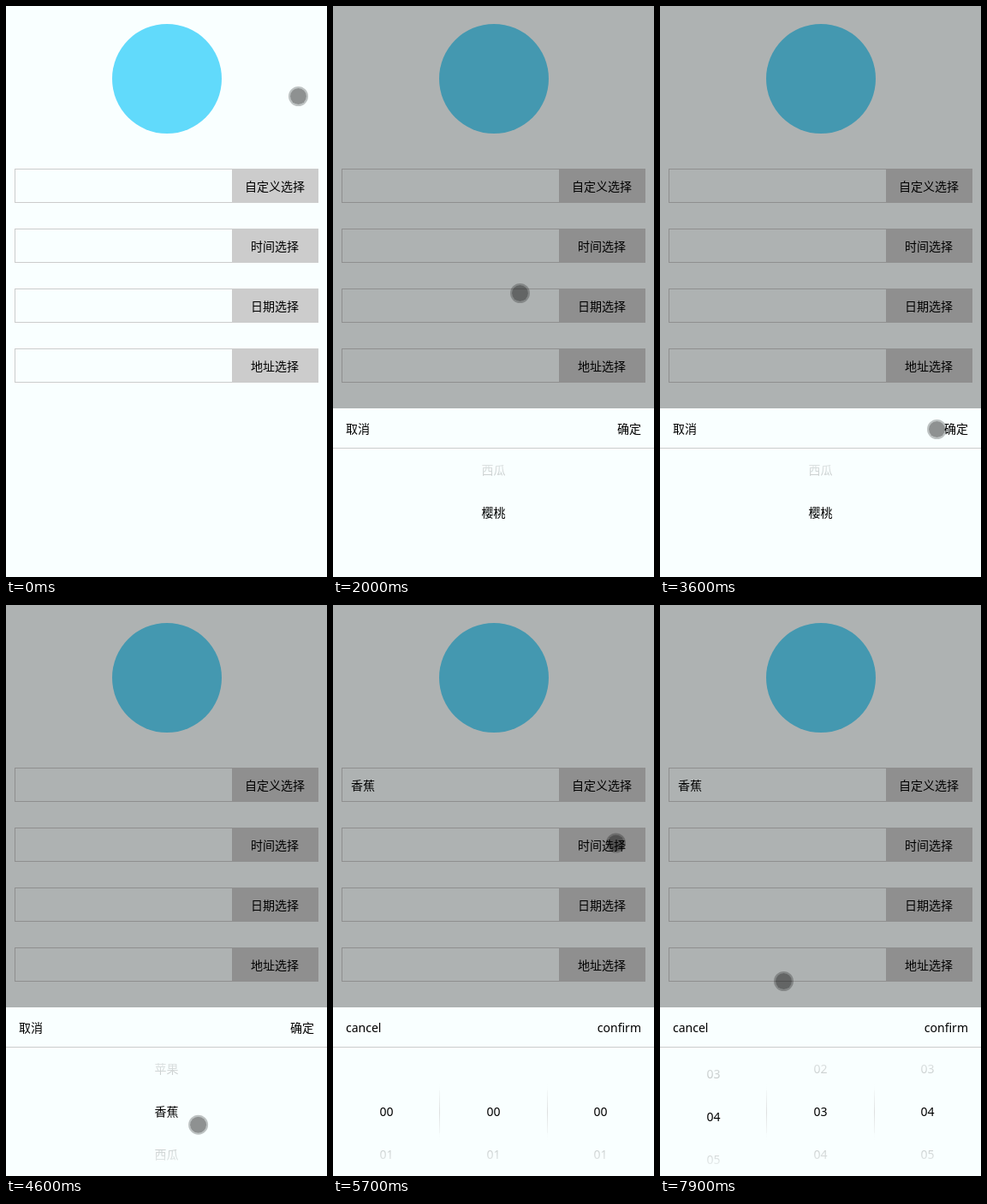
Animation of 375x667 px, one loop 8 s. Source, as an HTML page:

```html
<!DOCTYPE html>
<html lang="zh-CN">
<head>
<meta charset="utf-8">
<title>Picker</title>
<style>
  html, body { margin: 0; width: 100%; height: 100%; overflow: hidden; background: #f9ffff; }
  svg { display: block; width: 375px; height: 667px; }
  text { font: 14px "Noto Sans", "Noto Sans CJK SC", "Noto Sans CJK", sans-serif; fill: #000; }
  .mid { text-anchor: middle; }
  .end { text-anchor: end; }
</style>
</head>
<body>
<svg viewBox="0 0 375 667">
  <defs>
    <linearGradient id="fade" x1="0" y1="0" x2="0" y2="1">
      <stop offset="0" stop-color="#f9ffff"/>
      <stop offset="1" stop-color="#f9ffff" stop-opacity=".7"/>
    </linearGradient>
    <linearGradient id="rule" x1="0" y1="0" x2="0" y2="1">
      <stop offset="0" stop-color="#ccc" stop-opacity="0"/>
      <stop offset=".5" stop-color="#ccc" stop-opacity=".6"/>
      <stop offset="1" stop-color="#ccc" stop-opacity="0"/>
    </linearGradient>
    <clipPath id="window"><path d="M0 517H375V667H0Z"/></clipPath>
  </defs>
  <rect width="375" height="667" fill="#f9ffff"/>
  <circle cx="188" cy="85" r="64" fill="#61dafb"/>
  <g id="rows"></g>
  <text id="value" x="21" y="216"></text>
  <g id="sheet">
    <rect width="375" height="667" opacity=".3"/>
    <rect y="470" width="375" height="197" fill="#f9ffff"/>
    <path d="M0 516.5H375" stroke="#ccc"/>
    <text id="cancel" x="15" y="499"></text>
    <text id="confirm" class="end" x="360" y="499"></text>
    <g clip-path="url(#window)">
      <g id="fruit"></g>
      <g id="time">
        <rect x="124" y="560" width="1" height="65" fill="url(#rule)"/>
        <rect x="250" y="560" width="1" height="65" fill="url(#rule)"/>
      </g>
    </g>
    <rect y="517" width="375" height="50" fill="url(#fade)"/>
    <rect y="517" width="375" height="50" fill="url(#fade)" transform="matrix(1 0 0 -1 0 1184)"/>
  </g>
  <g id="cursor">
    <circle r="9.5" opacity=".43"/>
    <circle r="10.5" fill="none" stroke="#000" stroke-width="2" opacity=".24"/>
  </g>
</svg>
<script>
const $ = id => document.getElementById(id);
const LOOP = 8000, TICK = 100, PITCH = 50;
const ease = u => u * u * (3 - 2 * u);

$("rows").innerHTML = ["自定义选择", "时间选择", "日期选择", "地址选择"].map((s, i) => {
  const y = 190 + i * 70;
  return `<rect x="10.5" y="${y + .5}" width="354" height="39" fill="none" stroke="#ccc"/>
    <rect x="264" y="${y}" width="101" height="40" fill="#ccc"/>
    <text class="mid" x="314" y="${y + 26}">${s}</text>`;
}).join("");

// Wheels follow a drag one to one, then snap to the nearest item
function wheel(parent, x, items) {
  const g = document.createElementNS("http://www.w3.org/2000/svg", "g");
  g.innerHTML = items.map((s, i) =>
    `<text class="mid" x="${x}" y="${597 + i * PITCH}">${s}</text>`).join("");
  $(parent).append(g);
  const max = (items.length - 1) * PITCH, drags = [];
  const draw = k => {
    let scroll = 0;
    for (const d of drags.filter(d => d.start <= k)) {
      scroll = Math.max(0, Math.min(max, scroll + d.from.y - along(d, k).y));
      if (k > d.end) scroll = Math.round(scroll / PITCH) * PITCH;
    }
    g.setAttribute("transform", `translate(0 ${-scroll})`);
  };
  return { drags, draw };
}

const digits = Array.from({ length: 10 }, (_, i) => "0" + i);
const fruit = wheel("fruit", 187.5, ["苹果", "香蕉", "西瓜", "樱桃"]);
const [hour, minute, second] = [62.5, 187.5, 312.5].map(x => wheel("time", x, digits));

// Storyboard: each step advances the clock, counted in ticks
const moves = [], screens = [];
let clock = 0, pos = { x: 341.5, y: 105.5 };

function along(m, k) {
  const u = ease(Math.min(1, (k - m.start) / (m.end - m.start)));
  return { x: m.from.x + (m.to.x - m.from.x) * u, y: m.from.y + (m.to.y - m.from.y) * u };
}
function move(ticks, x, y) {
  const m = { start: clock, end: clock += ticks, from: pos, to: pos = { x, y } };
  moves.push(m);
  return m;
}
const drag = (target, ticks, x, y) => target.drags.push(move(ticks, x, y));
const wait = ticks => clock += ticks;
const tap = (sheet, value = "") => screens.push({ start: clock, sheet, value });

tap("");
move(1, 309.5, 198.5);
wait(4);
tap("fruit");
move(6, 212, 622);
wait(2);
drag(fruit, 7, 218.5, 335.5);
wait(2);
tap("");
move(4, 317.5, 210.5);
wait(2);
tap("fruit");
move(5, 338.5, 489.5);
wait(2);
move(1, 323.5, 494.5);
move(8, 200, 545);
drag(fruit, 1, 200, 627);
move(4, 357.5, 500.5);
wait(2);
tap("", "香蕉");
move(5, 330.5, 278);
wait(1);
tap("time", "香蕉");
wait(1);
move(6, 205, 643);
drag(minute, 3, 208.5, 541.5);
wait(1);
drag(minute, 2, 215, 490);
move(2, 290, 630);
drag(second, 3, 322, 434);
move(1, 115, 634);
drag(hour, 3, 144.5, 439.5);

const current = (list, k) => list.filter(s => s.start <= k).pop();
const show = (id, on) => $(id).style.display = on ? "" : "none";

function draw(ms) {
  const k = Math.floor(ms % LOOP / TICK);
  const { sheet, value } = current(screens, k), p = along(current(moves, k), k);
  const timeMode = sheet === "time";
  show("sheet", sheet);
  show("fruit", !timeMode);
  show("time", timeMode);
  $("value").textContent = value;
  $("cancel").textContent = timeMode ? "cancel" : "取消";
  $("confirm").textContent = timeMode ? "confirm" : "确定";
  for (const w of [fruit, hour, minute, second]) w.draw(k);
  $("cursor").setAttribute("transform", `translate(${p.x} ${p.y})`);
}

const start = performance.now();
function loop() {
  draw(performance.now() - start);
  requestAnimationFrame(loop);
}
loop();
</script>
</body>
</html>
```
